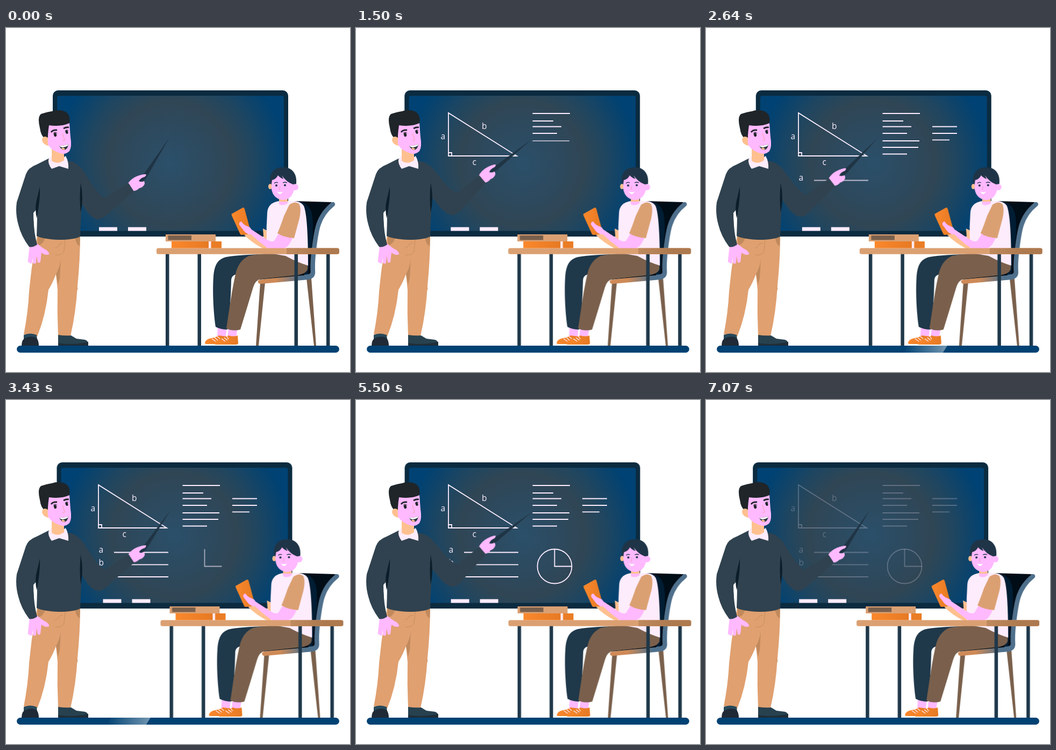
An HTML page for the animation above (7.14 s loop, 640 by 640 pixels).

```html
<!DOCTYPE html>
<html lang="en">
<head>
<meta charset="utf-8">
<title>Geometry lesson</title>
<style>
html, body { margin: 0; width: 100%; height: 100%; overflow: hidden; background: #fff; }
svg { display: block; width: 100vw; height: 100vh; }
#arm { transform-origin: 112px 270px; }
#pointer { transform-origin: 252px 282px; }
#chalk { fill: none; stroke: #fdeeff; stroke-width: 1.8; }
#chalk text { fill: #fdeeff; stroke: none; font: 15.5px "Open Sans", "Noto Sans", sans-serif; }
.pink { fill: #ffb9ff; }
.peach { fill: #ffc08f; }
.knit { fill: #30424f; }
.navy { fill: #1f384a; }
.brown { fill: #7a604c; }
.tan { fill: #dba072; }
.cloth { fill: #fdecfb; }
.trousers { fill: #e0a070; }
.fold { fill: #c18a5d; }
.slit { fill: #0b1e2a; }
.hair { fill: #1f2529; }
</style>
</head>
<body>
<svg viewBox="0 0 640 640">
  <defs>
    <radialGradient id="slate" gradientUnits="userSpaceOnUse" cx="306" cy="252" r="215">
      <stop offset="0" stop-color="#2b506a"/>
      <stop offset=".3" stop-color="#2d4a5f"/>
      <stop offset=".54" stop-color="#304655"/>
      <stop offset=".72" stop-color="#204660"/>
      <stop offset="1" stop-color="#004273"/>
    </radialGradient>
    <linearGradient id="seat" gradientUnits="userSpaceOnUse" x1="470" x2="575" y1="0" y2="0">
      <stop offset=".3" stop-color="#cf8a57"/>
      <stop offset=".75" stop-color="#4f708c"/>
    </linearGradient>
    <linearGradient id="desk" gradientUnits="userSpaceOnUse" x1="521" x2="585" y1="0" y2="0">
      <stop offset="0" stop-color="#c08a5e"/>
      <stop offset="1" stop-color="#ad794f"/>
    </linearGradient>
    <linearGradient id="orange" x1="0" x2="1" y1="0" y2="0">
      <stop offset="0" stop-color="#fb882c"/>
      <stop offset="1" stop-color="#e67a24"/>
    </linearGradient>
    <linearGradient id="glow" x1="0" x2="1" y1="0" y2="0">
      <stop offset="0" stop-color="#fff" stop-opacity="0"/>
      <stop offset="1" stop-color="#fff" stop-opacity=".45"/>
    </linearGradient>
    <clipPath id="floorClip"><rect x="20" y="591" width="600" height="13" rx="6.5"/></clipPath>
  </defs>

  <g class="drift">
    <rect x="87" y="116" width="438" height="272" rx="10" fill="#0b2b40"/>
    <rect x="95" y="126" width="422" height="251.5" rx="4" fill="url(#slate)"/>
    <path class="cloth" d="M173 370.500h34v7h-34zM227 370.500h34v7h-34z"/>
  </g>

  <g id="chalk"></g>

  <g clip-path="url(#floorClip)">
    <rect x="20" y="591" width="600" height="13" fill="#004273"/>
    <path id="shine" d="M-74 591H0L-8 604H-82Z" fill="url(#glow)"/>
  </g>

  <!-- student, chair and desk -->
  <g class="drift">
    <path d="M536 322L606 324Q590 340 580 376Q573 412 570 462L535 463Z" fill="#000c16"/>
    <path d="M540 323Q566 323 570 350Q574 380 565 425L562 460H540Z" fill="#001d33"/>
    <path d="M608 328C580 350 577 376 572 420Q570 440 571 455Q570 461 562 463L534 466" fill="none" stroke="#4f708c" stroke-width="8.500" stroke-linecap="round" stroke-linejoin="round"/>
    <path class="brown" d="M473 474H482L470 591H465ZM559 465H568L577 591H573Z"/>
    <path d="M473 468L545 460Q565 458 575 457Q574 466 563 468L474 476Q468 476 469 470Z" fill="url(#seat)"/>
    <path d="M464 465L555 456V460L470 468Z" fill="#000c16"/>

    <path class="pink" d="M394 553H411L409 575H393ZM414 558H431L428 575H412Z"/>
    <path class="navy" d="M390 556C386 530 384 490 386 462C388 440 394 430 410 426Q440 421 490 421L470 440L424 460Q419 463 419 470Q418 520 412 561Q399 561 390 556Z"/>
    <path class="brown" d="M410 559C416 520 421 482 428 454Q434 432 452 424Q490 416 526 422L562 432L561 449Q558 458 540 460L474 467Q464 469 460 482Q448 522 436 561Q422 565 410 559Z"/>
    <g fill="url(#orange)">
      <path d="M370 586Q371 579 382 577Q390 576 396 572L411 574V588H374Q370 588 370 586Z"/>
      <path d="M388 587Q389 580 400 578Q408 577 414 572Q424 575 431 572L432 586Q432 589 428 589H391Q388 589 388 587Z"/>
    </g>
    <path d="M383 578L390 583M388 576L394 581M393 574L398 578M401 578L408 583M406 576L412 581M411 574L414 579" fill="none" stroke="#fdeeff" stroke-width="1.300"/>

    <path class="peach" d="M443 385L453 380L480 400L478 373L488 378V410H478Q458 400 443 385Z"/>
    <path class="cloth" d="M508 322H524Q548 320 554 331Q562 350 562 442Q542 436 520 424L485 418V395Q484 370 486 344Q487 325 508 322Z"/>
    <path d="M419.500 346L440 334.500Q443 333 444 337L454 374Q456 381 449 384L438 385Q436 385 435 382L420 349Z" fill="url(#orange)"/>
    <path class="pink" d="M434 366Q433 361 438 360Q441 365 445 367L454 371Q456 375 460 377L486 394Q494 399 499 396L507 383L533 391Q525 410 515 410H488Q474 401 456 384Q448 384 443 378Z"/>
    <path class="tan" d="M527 329Q538 321 545 327Q550 334 546 354L536 391Q518 390 505 382Q511 368 517 350Z"/>

    <path class="pink" d="M508 312H524V326Q516 332 508 328Z"/>
    <path class="peach" d="M508 318Q516 321 524 317V323H508Z"/>
    <ellipse class="peach" cx="491.500" cy="295" rx="3.500" ry="5"/>
    <path class="pink" d="M494 278Q512 267 537 284L536 300Q532 320 514 320Q497 317 494 300Z"/>
    <circle class="pink" cx="538" cy="296" r="6"/>
    <path d="M491 289C489 270 499 259 515 259C533 259 542 272 540 290L534 291Q522 287 513 274Q516 280 516 281Q509 278 506 274Q503 281 495 283L494 290Z" fill="#1f3547"/>
    <g fill="#1f3547"><circle cx="503" cy="293" r="2"/><circle cx="519" cy="292.500" r="2"/></g>
    <path d="M499 289Q502 286 506 288M515 288Q519 286 523 288" fill="none" stroke="#1f3547" stroke-width="1.300"/>
    <path d="M510 294L508 300H510" fill="none" stroke="#f49bbd" stroke-width="1"/>
    <path d="M504 304Q510 307 515 304Q513 309 509 309Q506 308 504 304Z" fill="#fff"/>

    <path class="navy" d="M297 420h6.500v171h-6.500zM356.500 420h6.500v171h-6.500zM536.500 420h6.500v171h-6.500zM596 420h6.500v171h-6.500z"/>
    <rect class="tan" x="280" y="409.500" width="340" height="11.300" rx="3.500"/>
    <path d="M522 409.500H616Q620 409.500 620 413V417Q620 420.800 616 420.800H522Z" fill="url(#desk)"/>
    <rect class="tan" x="297" y="384" width="93" height="13"/>
    <rect class="brown" x="301.500" y="386" width="43.500" height="8.500"/>
    <rect x="308" y="397" width="69" height="12.500" fill="url(#orange)"/>
    <rect class="cloth" x="377" y="397" width="4.500" height="12.500"/>
    <rect x="381.500" y="397" width="19.500" height="12.500" fill="#ea7d25"/>
  </g>

  <!-- teacher -->
  <g id="arm">
    <path id="pointer" d="M304 204L261 279Q256 285 250 287L247 284Q250 281 254 275Z" fill="#1f3444"/>
    <path class="pink" d="M227 289Q233 280 243 276Q253 272 260 272Q262 274 258 277Q250 279 247 285Q252 287 257 285Q259 289 257 292Q254 297 248 298Q242 304 236 303Z"/>
    <path class="knit" d="M112 250Q132 246 146 269L163 296Q176 314 184 316L228 288.500L238 304L196 340Q182 355 170 356Q160 354 150 341L138 322Q112 305 112 270Z"/>
  </g>
  <path class="trousers" d="M58 386H138Q138 430 133 480Q130 530 120 573H97Q95 530 96 488L93 458Q86 476 79 487Q74 535 58 574L33 570Q41 530 43 490Q45 470 48 445Z"/>
  <path class="fold" d="M93 458Q100 446 102 430L100 465L97 478ZM59 388L73 390Q70 402 59 405ZM128 389L138 388L137 406Q131 404 128 389Z"/>
  <path d="M110 394L108 415Q104 424 92 422M91 409Q97 408 99 402L106 400M131 482L133 484L132 488" fill="none" stroke="#c8905f" stroke-width="1"/>
  <path class="pink" d="M44 404L58 401Q67 409 75 413Q81 418 80 421Q74 424 66 418L64 435Q62 438 59 436L57 424L56 437Q53 440 50 437V428L48 438Q45 439 43 436Q40 437 41 431Z"/>
  <path d="M33 571Q45 566 57 571L58 580H33Z" fill="#27495b"/>
  <path d="M29 591Q29 578 38 576Q50 572 57 577Q61 582 61 591Z" fill="#1f2a36"/>
  <path d="M97 571Q110 573 121 572L131 578L147 580Q154 582 153 591H97Z" fill="#27414f"/>
  <path d="M97 586Q122 591 153 584V591H97Z" fill="#1f2d38"/>

  <path class="knit" d="M79 243L116 247Q133 249 137 262L141 320L138 388Q126 394 98 394Q70 393 57 387L58 340L52 345Q50 374 58 403Q49 409 43 407Q28 387 23 366Q17 345 20 324L37 272Q41 260 57 254Z"/>
  <path d="M51 344L57 337L58 340L57 386Q51 365 51 344Z" fill="#fff"/>
  <path class="slit" d="M63 295Q64 318 57 354Q54 338 56 325ZM139 288Q145 318 139 343Q136 318 139 288Z"/>
  <path class="cloth" d="M83 238L79 245Q78 253 85 262L99 257L116 262Q117 249 111 238Q97 250 83 238Z"/>
  <path class="peach" d="M85 222H108V246Q96 255 85 247Z"/>
  <path class="hair" d="M72 205Q65 201 63 186Q58 166 65 160Q77 156 85 155Q99 150 111 156Q121 163 118 177L90 190L79 205Z"/>
  <path class="peach" d="M79 219Q69 217 67 209Q67 203 72 202Q77 202 80 207Z"/>
  <path class="pink" d="M80 181Q103 184 118 177L120 203Q123 221 118 229Q112 235 105 234Q84 229 78 216Q77 200 80 181Z"/>
  <g fill="none" stroke="#1f2529" stroke-width="2.800">
    <path d="M84 194Q87 189 95 190M107 187Q112 184 117 185"/>
  </g>
  <g class="hair">
    <ellipse cx="91.500" cy="198.500" rx="2.600" ry="3.700" transform="rotate(-15 91.500 198.500)"/>
    <ellipse cx="113" cy="193.500" rx="2.400" ry="3.500" transform="rotate(-15 113 193.500)"/>
  </g>
  <path d="M88 196Q91 192 95 196M110 192Q113 188 116 191" fill="none" stroke="#1f2529" stroke-width="1"/>
  <path d="M105 196L109 207Q109 210 105 210" fill="none" stroke="#f7a6b4" stroke-width="1.200"/>
  <path d="M99 219Q108 220 116 216Q115 226 108 227Q102 226 99 219Z" fill="#27343d"/>
  <path d="M99 219Q108 220 116 216L115 219Q107 224 101 221Z" fill="#fff"/>
  <path class="peach" d="M103 224Q106 221 110 225L108 227Q105 227 103 224Z"/>
</svg>
<script>
const LOOP = 7140;
const at = (ms, props) => ({ offset: ms / LOOP, ...props });
const play = (el, frames) => el.animate(frames, { duration: LOOP, iterations: Infinity });
const get = id => document.getElementById(id);

// Swings evenly between rest and peak, the given number of times per loop.
function swing(el, rest, peak, times) {
  const frames = [];
  for (let i = 0; i <= times * 2; i++) {
    frames.push({ offset: i / (times * 2), transform: i % 2 ? peak : rest });
  }
  play(el, frames);
}

document.querySelectorAll(".drift").forEach(el =>
  swing(el, "translateX(0px)", "translateX(7.8px)", 1));
swing(get("arm"), "rotate(0deg)", "rotate(-8.4deg)", 2);
swing(get("pointer"), "rotate(0deg)", "rotate(30.4deg)", 2);

const shift = x => ({ transform: `translateX(${x}px)` });
play(get("shine"), [
  at(0, shift(704)), at(1510, shift(704)), at(2640, shift(449)), at(3430, shift(269)),
  at(4430, shift(64)), at(4780, shift(-10)), at(LOOP, shift(-10))
]);

const path = d => ["path", { d }];
const line = (x1, x2, y) => path(`M${x1} ${y}H${x2}`);
const label = (x, y, text) => ["text", { x, y }, text];

// Board notes in writing order
const notes = [
  path("M172 158V238H299ZM172 232H178V238"),
  label(157.500, 207, "a"), label(234, 187.500, "b"), label(216.500, 254.500, "c"),
  ...[[398, 159], [367, 173], [382, 183.5], [374, 196], [397, 210], [395, 222], [374, 234.5]]
    .map(([x, y]) => line(328.5, x, y)),
  ...[[467, 183.5], [467, 196], [453, 208.3]].map(([x, y]) => line(421, x, y)),
  label(172.500, 283.500, "a"), line(201, 302, 283.5),
  label(172.500, 308, "b"), line(201, 302, 306.3),
  label(172.500, 329, "c"), line(201, 302, 329),
  path("M369.5 277.500V309.500H401.500"),
  ["circle", { cx: 369.5, cy: 309.5, r: 32 }]
];

const FIRST = 115, STEP = 161;
notes.forEach(([tag, attrs, text = ""], i) => {
  const el = document.createElementNS("http://www.w3.org/2000/svg", tag);
  for (const key in attrs) el.setAttribute(key, attrs[key]);
  el.textContent = text;
  get("chalk").append(el);
  const start = FIRST + i * STEP;
  play(el, [
    at(0, { opacity: 0 }), at(start, { opacity: 0 }), at(start + STEP, { opacity: 1 }),
    at(6860, { opacity: 1 }), at(LOOP, { opacity: 0 })
  ]);
});
</script>
</body>
</html>
```
